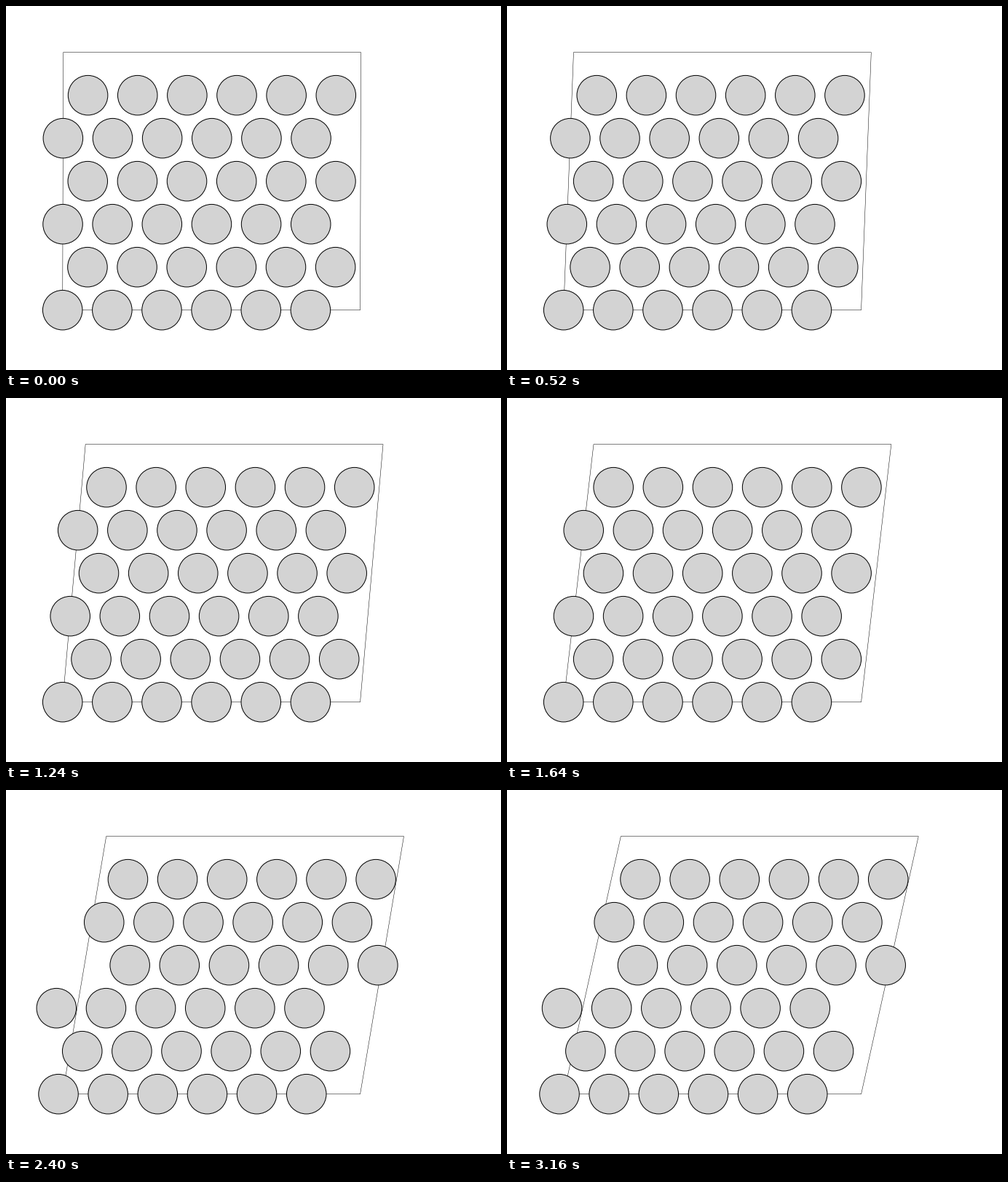
A matplotlib script for the animation above (3.2 s loop, 680 px wide and 500 px high).

```python
import matplotlib.pyplot as plt
from matplotlib.animation import FuncAnimation
from matplotlib.patches import Circle, Polygon

W, H, DPI = 680, 500, 100
FRAMES, INTERVAL = 80, 40
PX = 72 / DPI                      # one pixel in points

ROWS = COLS = 6
B = 68.14                          # spacing of the atoms in a row
ROW_H = B * 3 ** 0.5 / 2
R = 0.4 * B
X0, Y0 = 77.7, 417.7               # lower left corner of the cell
BOX_W, BOX_H = COLS * B, ROWS * ROW_H
MAX_SHIFT = BOX_H * 2 / 9          # travel of the top edge
SLIP_STEP = 50                     # the upper half slips one spacing here


def top_shift(step):
    return MAX_SHIFT * (step + 1) / FRAMES


def slip(row):
    """Jump of a row once the middle plane has given way."""
    if row >= ROWS // 2:
        return B * (2 * (ROWS - 1 - row) + 1) / 12
    return -B * (2 * row + 1) / 12


def row_start(row, step):
    x = X0 + (row % 2) * B / 2 + top_shift(step) * row / ROWS
    return x + slip(row) if step >= SLIP_STEP else x


def box_corners(step):
    s = top_shift(step)
    return [(X0, Y0), (X0 + BOX_W, Y0),
            (X0 + BOX_W + s, Y0 - BOX_H), (X0 + s, Y0 - BOX_H)]


fig = plt.figure(figsize=(W / DPI, H / DPI), dpi=DPI, facecolor="white")
ax = fig.add_axes([0, 0, 1, 1])
ax.set_xlim(0, W)
ax.set_ylim(H, 0)
ax.axis("off")

box = ax.add_patch(Polygon(box_corners(0), fill=False, ec="black",
                           lw=0.5 * PX, joinstyle="miter", zorder=1))
atoms = [[ax.add_patch(Circle((0, 0), R, fc="lightgray", ec="black",
                              lw=PX, zorder=2))
          for _ in range(COLS)] for _ in range(ROWS)]


def draw(step):
    box.set_xy(box_corners(step))
    for row, line in enumerate(atoms):
        x = row_start(row, step)
        for col, atom in enumerate(line):
            atom.center = (x + col * B, Y0 - row * ROW_H)
    return [box] + sum(atoms, [])


anim = FuncAnimation(fig, draw, frames=FRAMES, interval=INTERVAL,
                     repeat=True, repeat_delay=0)
plt.show()
```
